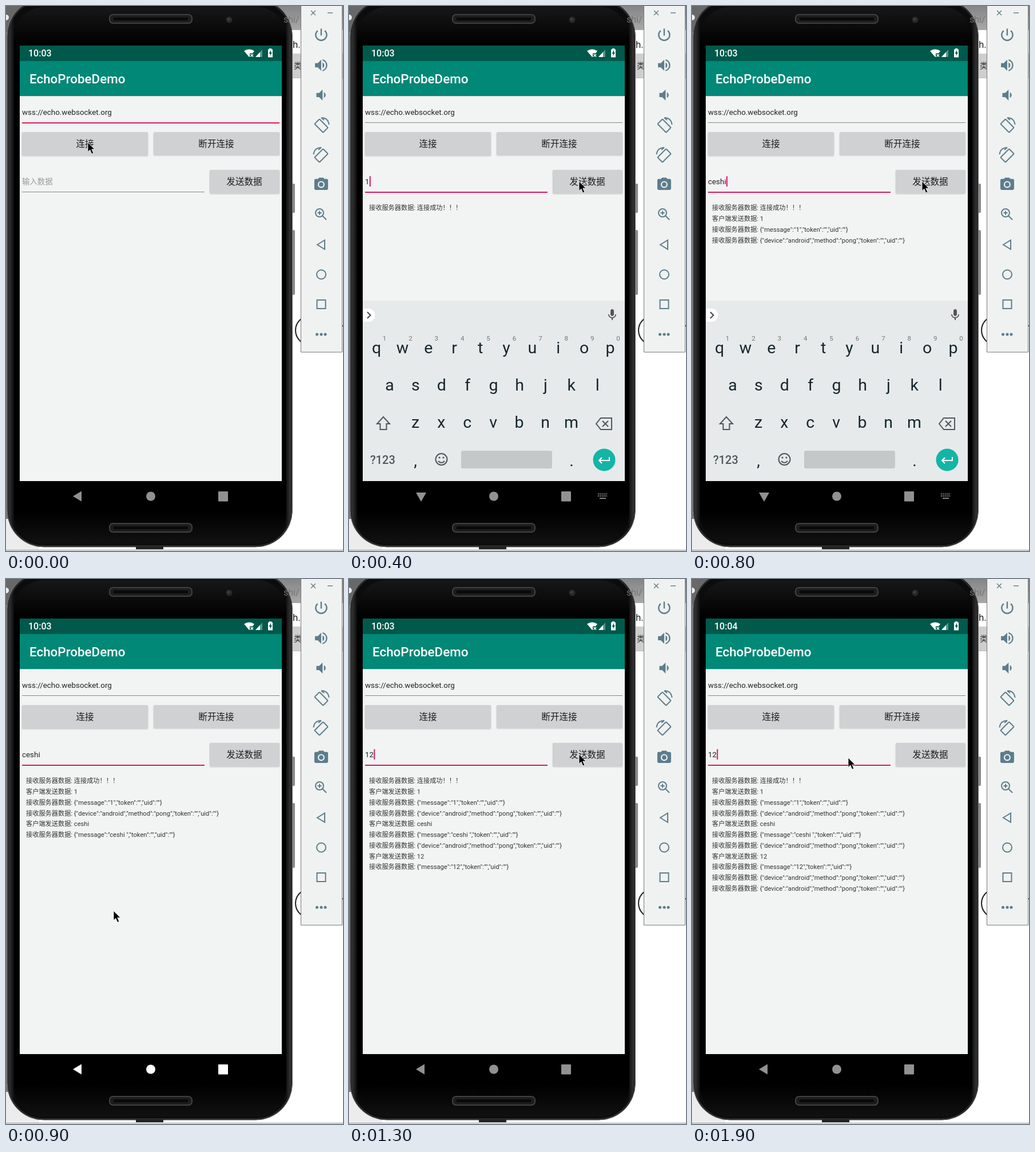
These frames come from a looping animation (589x951 px, 2000 ms). An HTML page:

```html
<!DOCTYPE html>
<html lang="zh">
<head>
<meta charset="utf-8">
<style>
  html, body { margin: 0; width: 100%; height: 100%; overflow: hidden; background: #fff; }
  svg { display: block; font-family: Roboto, "Noto Sans CJK SC", "Noto Sans CJK", sans-serif; }
  .line { fill: none; stroke-width: 2; }
  .mid { text-anchor: middle; }
  .field { font-size: 13.4px; }
  .button rect { fill: #cfd1d2; filter: drop-shadow(0 1px 1px #0003); }
  .button text { font-size: 15.6px; fill: #1c1c1c; text-anchor: middle; }
</style>
</head>
<body>
<svg width="589" height="951" viewBox="0 0 589 951">
  <defs>
    <linearGradient id="rim">
      <stop stop-color="#151515"/><stop offset=".008" stop-color="#303030"/>
      <stop offset=".024" stop-color="#0c0c0c"/><stop offset=".976" stop-color="#0c0c0c"/>
      <stop offset=".992" stop-color="#303030"/><stop offset="1" stop-color="#151515"/>
    </linearGradient>
    <linearGradient id="face" x2="0" y2="1">
      <stop stop-color="#171717"/><stop offset=".07" stop-color="#000"/>
      <stop offset=".94" stop-color="#000"/><stop offset="1" stop-color="#111"/>
    </linearGradient>
    <linearGradient id="tab" x2="0" y2="1">
      <stop stop-color="#858585"/><stop offset="1" stop-color="#a9a9a9"/>
    </linearGradient>
    <clipPath id="screen"><path d="M24 69h458v760H24z"/></clipPath>
  </defs>

  <!-- desktop behind the phone -->
  <path fill="#fff" d="M0 0h589v951H0z"/>
  <path fill="#686868" d="M0 0h60v45H0z"/>
  <path fill="#777" d="M0 45h5v850H0z"/>
  <path fill="#ececec" d="M0 895h58v54H0z"/>
  <circle cy="20" r="5" fill="#eee"/><circle cx="21" cy="20" r="5" fill="#eee"/>
  <path fill="url(#tab)" d="M440 0h149v42H440z"/>
  <path fill="#cecece" d="M495 83h94v42h-94z"/>
  <path stroke="#bbb" d="M495 125.5h94"/>
  <path stroke="#8a8a8a" d="M0 949.5h589"/>
  <circle class="line" cx="531" cy="566" r="25" stroke="#222"/>
  <path stroke="#333" stroke-width="2" d="M587 558h2"/>

  <!-- phone -->
  <path fill="#8a8a8a" d="M499 310h4q2 0 2 2v47q0 2-2 2h-4zM499 391h4q2 0 2 2v109q0 2-2 2h-4z"/>
  <rect x="2" y="-12" width="498.500" height="956" rx="64" fill="url(#rim)" stroke="#777"/>
  <rect x="4" y="-10" width="494.500" height="952" rx="62" fill="none" stroke="#2c2c2c" stroke-width="2"/>
  <rect x="14" y="2" width="476" height="936" rx="52" fill="url(#face)"/>
  <path fill="#222" d="M227 943h48v5h-48z"/>
  <g fill="#1d1d1d" stroke="#414141" stroke-width="2">
    <rect x="181" y="15" width="144" height="15" rx="6"/>
    <rect x="181" y="903" width="144" height="15" rx="6"/>
  </g>
  <path fill="none" stroke="#090909" d="M188 22.5h130M188 910.5h130" stroke-width="5"/>
  <circle cx="390" cy="24" r="5.5" fill="#292929"/><circle cx="389" cy="23" r="2" fill="#444"/>
  <text x="485" y="29" font-size="16" fill="#747474">shi/</text>
  <text x="501" y="73" font-size="17" fill="#222">h.</text>
  <text x="503" y="109" font-size="14" fill="#333">类</text>

  <!-- app -->
  <g clip-path="url(#screen)">
    <path fill="#f2f4f4" d="M24 69h458v760H24z"/>
    <path fill="#00594b" d="M24 69h458v27H24z"/>
    <path fill="#018876" d="M24 96h458v61H24z"/>
    <path fill="#000" opacity=".12" d="M24 157h458v1H24z"/>
    <g fill="#fff" font-weight="500">
      <text id="clock" x="39" y="88" font-size="16"></text>
      <text x="41" y="135" font-size="22.4">EchoProbeDemo</text>
      <path d="M416 78.5q9-6 18 0l-3 4h-5v6.5h-1z"/>
      <path d="M427.5 84l4.5 4.5m0-4.5l-4.5 4.5" stroke="#fff" stroke-width="1.5"/>
      <path opacity=".35" d="M448 76v13h-12z"/><path d="M444 80.5v8.5h-8z"/>
      <path d="M460 75.5v-1.5h4v1.5h2v14h-8v-14z"/>
      <path fill="#00594b" d="M463 77l-3.5 6h2v4l3.5-6h-2z"/>
    </g>
    <text class="field" x="28" y="189.5" fill="#222">wss://echo.websocket.org</text>
    <rect id="urlLine" x="28" y="203" width="450"/>
    <g class="button">
      <rect x="28" y="220" width="220" height="41" rx="2"/><text x="138" y="246">连接</text>
      <rect x="258" y="220" width="220" height="40" rx="2"/><text x="367.5" y="246">断开连接</text>
      <rect x="356" y="286" width="122" height="41" rx="2"/><text x="416.5" y="312">发送数据</text>
    </g>
    <text class="field" id="input" x="28" y="311"></text>
    <rect id="inputLine" x="28" y="324" width="319"/>
    <rect id="caret" y="297" width="2" height="18" fill="#d81b60"/>
    <g id="log" font-size="11.2" fill="#333"></g>

    <g id="keyboard" fill="#17262c">
      <path fill="#e6eaeb" d="M24 514h458v315H24z"/>
      <path fill="#fff" d="M24 528h10a11.5 11.5 0 0 1 0 23H24z"/>
      <path class="line" stroke="#444" d="M32 534l5.500 5.500-5.500 5.500"/>
      <path fill="#555" transform="translate(448 527)" d="M12 14c1.66 0 3-1.34 3-3V5c0-1.66-1.34-3-3-3S9 3.34 9 5v6c0 1.660 1.340 3 3 3zm5.300-3c0 3-2.540 5.100-5.300 5.100S6.700 14 6.700 11H5c0 3.410 2.720 6.230 6 6.720V21h2v-3.280c3.280-.480 6-3.300 6-6.720z"/>
      <g id="keys" class="mid" font-size="28.5"></g>
      <g id="digits" class="mid" font-size="11.5" fill="#777"></g>
      <text x="37" y="799" font-size="20" font-weight="500" fill="#4f575a">?123</text>
      <rect x="196" y="776" width="159" height="31" rx="3" fill="#c5c8c9"/>
      <circle cx="446" cy="792" r="19.500" fill="#13b5a6"/>
      <path class="line" stroke="#fff" d="M455 787v6h-18m5-5l-5 5 5 5"/>
      <g class="line" stroke="#4f575a">
        <path d="M60 717l-11 12h5.500v10h11v-10H71z"/>
        <path d="M440 719h19v20h-19l-8-10zM443 724l10 10m0-10l-10 10"/>
        <circle cx="161.500" cy="791" r="10"/><path d="M156 794q5.500 6 11 0"/>
      </g>
      <g fill="#4f575a"><circle cx="158" cy="788" r="1.600"/><circle cx="165" cy="788" r="1.600"/></g>
    </g>
  </g>

  <g id="nav">
    <path id="back"/>
    <circle cx="253" cy="855.500" r="8"/>
    <rect x="371" y="847" width="17" height="17.500" rx="1"/>
    <path id="imeSwitch" fill="none" stroke="#919191" stroke-width="1.800" stroke-dasharray="1.800 1.500" d="M435 851.500h17M435 855h17"/>
    <path id="imeSpace" stroke="#919191" stroke-width="1.800" d="M438 859h11"/>
  </g>

  <!-- emulator toolbar -->
  <path fill="#f0f2f1" stroke="#777" d="M515.500-1h72v605h-72z"/>
  <path class="line" stroke="#657f8b" style="stroke-width:1.500" d="M533 8l8 8m0-8l-8 8M562 12h9"/>
  <g fill="#5c7d8c" fill-rule="evenodd">
    <path transform="translate(536.500 36) scale(1.200)" d="M13 3h-2v10h2zm4.830 2.170l-1.420 1.420C18 7.860 19 9.810 19 12a7 7 0 0 1-14 0c0-2.190 1-4.140 2.580-5.420L6.170 5.170A9 9 0 1 0 17.830 5.170z"/>
    <path transform="translate(536.500 89) scale(1.200)" d="M3 9v6h4l5 5V4L7 9zm13.500 3c0-1.770-1-3.290-2.500-4v8c1.480-.730 2.500-2.250 2.500-4zM14 3.230v2.060a7 7 0 0 1 0 13.420v2.060a9 9 0 0 0 0-17.540z"/>
    <path transform="translate(536.500 141) scale(1.200)" d="M18.500 12c0-1.770-1-3.290-2.500-4v8c1.480-.730 2.500-2.250 2.500-4zM5 9v6h4l5 5V4L9 9z"/>
    <path transform="translate(536.500 297) scale(1.200)" d="M9 2L7.170 4H4a2 2 0 0 0-2 2v12a2 2 0 0 0 2 2h16a2 2 0 0 0 2-2V6a2 2 0 0 0-2-2h-3.170L15 2zM12 17a5 5 0 1 1 0-10 5 5 0 0 1 0 10zm0-1.800a3.200 3.200 0 1 0 0-6.400 3.200 3.200 0 0 0 0 6.400z"/>
    <circle cx="543.500" cy="573" r="2.500"/><circle cx="551" cy="573" r="2.500"/><circle cx="558" cy="573" r="2.500"/>
  </g>
  <g class="line" stroke="#5c7d8c">
    <g id="rotate">
      <rect x="-6" y="-10.500" width="12" height="21" rx="1" transform="translate(551 209) rotate(-45)"/>
      <path d="M551 195q12 0 13.500 12m-13.500-12l5 4"/>
    </g>
    <use href="#rotate" transform="matrix(-1 0 0 1 1102 52)"/>
    <circle cx="548" cy="361" r="7"/><path d="M553 366l7 7M544.500 361h7m-3.500-3.500v7"/>
    <path d="M544 416.500l13-8v16z"/>
    <circle cx="551" cy="468.500" r="8"/>
    <path d="M543.500 513h15v15h-15z"/>
  </g>

  <path id="cursor" stroke="#fff" stroke-width=".8" d="M0 0v16.500l3.800-3.500 3 7 3-1.300-3-6.700h5.200z"/>
</svg>

<script>
const $ = id => document.getElementById(id);
const STEP = 100, LOOP = 2000;
const PINK = '#d81b60', GRAY = '#919191';

const received = body => '接收服务器数据: ' + body;
const sent = text => '客户端发送数据: ' + text;
const echo = text => received(`{"message":"${text}","token":"","uid":""}`);
const pong = received('{"device":"android","method":"pong","token":"","uid":""}');
const messages = [
  received('连接成功！！！'), sent('1'), echo('1'), pong,
  sent('ceshi'), echo('ceshi '), pong,
  sent('12'), echo('12'), pong, pong
];

// Each entry holds from its time until the next one.
const logTimes = [100, 500, 500, 600, 900, 900, 1000, 1300, 1300, 1500, 1800];
const typed = [[0, ''], [400, '1'], [600, ''], [800, 'ceshi'], [1000, ''], [1100, '1'], [1200, '12']];
const keyboardShown = [[0, false], [300, true], [500, false], [700, true], [900, false], [1100, true], [1300, false]];
const caretShown = [[0, false], [200, true], [600, false], [700, true], [900, false], [1100, true]];
const navColor = [[0, GRAY], [500, '#fff'], [700, GRAY], [900, '#fff'], [1100, GRAY]];
const pointer = [
  [0, 143, 238], [200, 122, 305], [300, 122, 305], [400, 402, 306], [500, 402, 306],
  [600, 83, 322], [700, 83, 322], [800, 402, 306], [900, 188, 579], [1100, 192, 326],
  [1200, 192, 326], [1300, 402, 306], [1500, 346, 285], [1900, 273, 312], [2000, 273, 312]
];

const valueAt = (track, t) => track.findLast(([start]) => start <= t)[1];

function pointerAt(t) {
  const next = pointer.findIndex(([time]) => time > t);
  const [t0, x0, y0] = pointer[next - 1], [t1, x1, y1] = pointer[next];
  const k = (t - t0) / (t1 - t0);
  return [x0 + (x1 - x0) * k, y0 + (y1 - y0) * k];
}

function addText(parent, x, y, content) {
  const node = document.createElementNS('http://www.w3.org/2000/svg', 'text');
  node.setAttribute('x', x);
  node.setAttribute('y', y);
  node.textContent = content;
  $(parent).append(node);
  return node;
}

const logLines = messages.map((text, i) => addText('log', 35, Math.round(356.4 + 18.75 * i), text));

const PITCH = 45.4;
[['qwertyuiop', 48, 606], ['asdfghjkl', 71, 671], ['zxcvbnm', 116, 736]].forEach(([row, x, y]) =>
  [...row].forEach((key, i) => addText('keys', x + PITCH * i, y, key)));
addText('keys', 116, 803, ',');
addText('keys', 389, 803, '.');
[...'1234567890'].forEach((digit, i) => addText('digits', 62 + PITCH * i, 584, digit));

function show(node, visible) {
  node.style.display = visible ? '' : 'none';
}

function underline(id, active) {
  $(id).setAttribute('fill', active ? PINK : '#858585');
  $(id).setAttribute('height', active ? 2 : 1);
}

function render(t) {
  const text = valueAt(typed, t), keyboard = valueAt(keyboardShown, t);
  $('clock').textContent = t < 1900 ? '10:03' : '10:04';
  underline('urlLine', t < 300);
  underline('inputLine', t >= 200);

  $('input').textContent = text || '输入数据';
  $('input').setAttribute('fill', text ? '#222' : '#999');
  $('caret').setAttribute('x', 28.3 + (text ? $('input').getComputedTextLength() : 0));
  show($('caret'), valueAt(caretShown, t));
  logLines.forEach((line, i) => show(line, t >= logTimes[i]));

  show($('keyboard'), keyboard);
  show($('imeSwitch'), keyboard);
  show($('imeSpace'), keyboard);
  $('nav').setAttribute('fill', valueAt(navColor, t));
  $('back').setAttribute('d', keyboard ? 'M117 849h18l-9 16z' : 'M117 855.5l15-9v18z');
  $('cursor').setAttribute('transform', `translate(${pointerAt(t)})`);
}

function tick() {
  render(Math.floor(performance.now() % LOOP / STEP) * STEP);
  requestAnimationFrame(tick);
}
tick();
</script>
</body>
</html>
```
